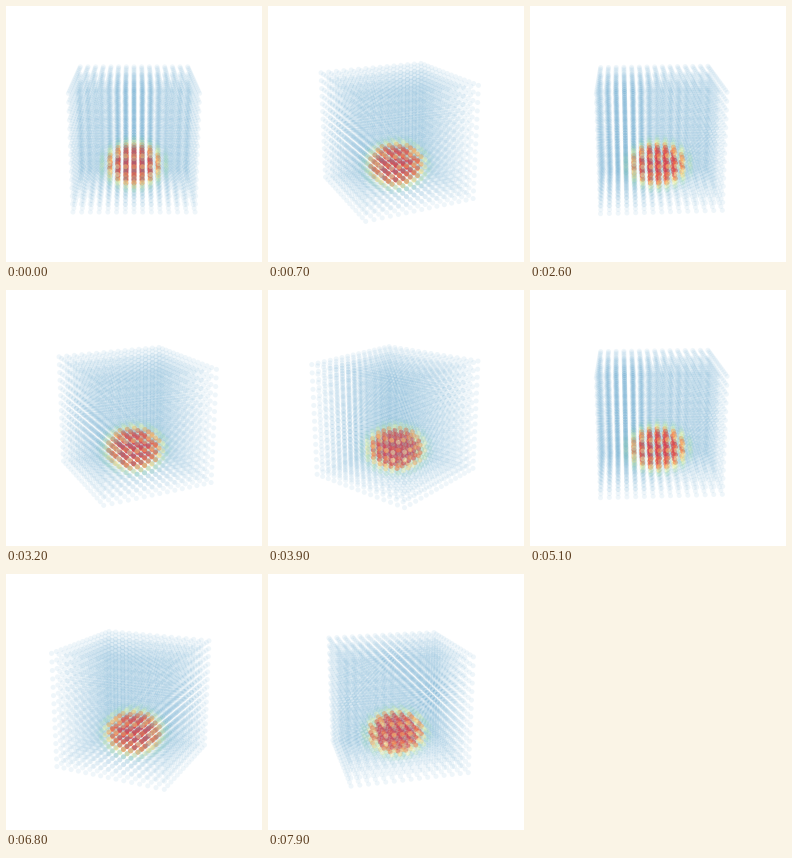
Recreate the animation shown at these times as a matplotlib script. Size 256x256 px, loop 8000 ms.

```python
import numpy as np
import matplotlib.pyplot as plt
from matplotlib.animation import FuncAnimation
from matplotlib.colors import LinearSegmentedColormap

SIZE, DPI = 256, 100
FRAMES, INTERVAL = 80, 100
STEP = np.radians(3.6)
HALF = 7                          # grid runs from -HALF to HALF
ELEV = np.arctan(1 / 3)
DIST, FOCAL = 9.82, 561
CENTER = (128, 128.8)
DOT = 5.0                         # dot diameter in pixels

CMAP = LinearSegmentedColormap.from_list("heat", [
    "#4a99c8", "#66c2a5", "#abdda4", "#e6f598", "#ffffbf",
    "#fee08b", "#fdae61", "#f46d43", "#d53e4f"])

axis = np.arange(-HALF, HALF + 1)
X, Y, Z = (g.ravel() / HALF for g in np.meshgrid(axis, axis, axis))


def heat():
    """Flattened hot blob low in the cube, with a soft rim."""
    r = HALF * np.sqrt(X**2 + Y**2 + (1.35 * (Z + 0.55))**2)
    return 1 / (1 + np.exp(3 * (r - 3.7)))


def project(angle):
    c, s = np.cos(angle), np.sin(angle)
    u, v = X * c + Y * s, Y * c - X * s
    depth = DIST - v * np.cos(ELEV) - Z * np.sin(ELEV)
    up = Z * np.cos(ELEV) - v * np.sin(ELEV)
    px = CENTER[0] + FOCAL * u / depth
    py = CENTER[1] - FOCAL * up / depth
    return np.column_stack([px, py]), np.argsort(-depth)


value = heat()
colors = CMAP(value)
colors[:, 3] = 0.085 + 0.6 * np.clip(value * 1.3, 0, 1)

fig = plt.figure(figsize=(SIZE / DPI, SIZE / DPI), dpi=DPI, facecolor="white")
ax = fig.add_axes([0, 0, 1, 1])
ax.set_xlim(0, SIZE)
ax.set_ylim(SIZE, 0)
ax.axis("off")
dots = ax.scatter(X, Y, s=(DOT * 72 / DPI)**2, linewidths=0)


def draw(i):
    pos, order = project(i * STEP)
    dots.set_offsets(pos[order])
    dots.set_facecolors(colors[order])
    return dots,


anim = FuncAnimation(fig, draw, frames=FRAMES, interval=INTERVAL,
                     repeat=True, repeat_delay=0, blit=False)
plt.show()
```
